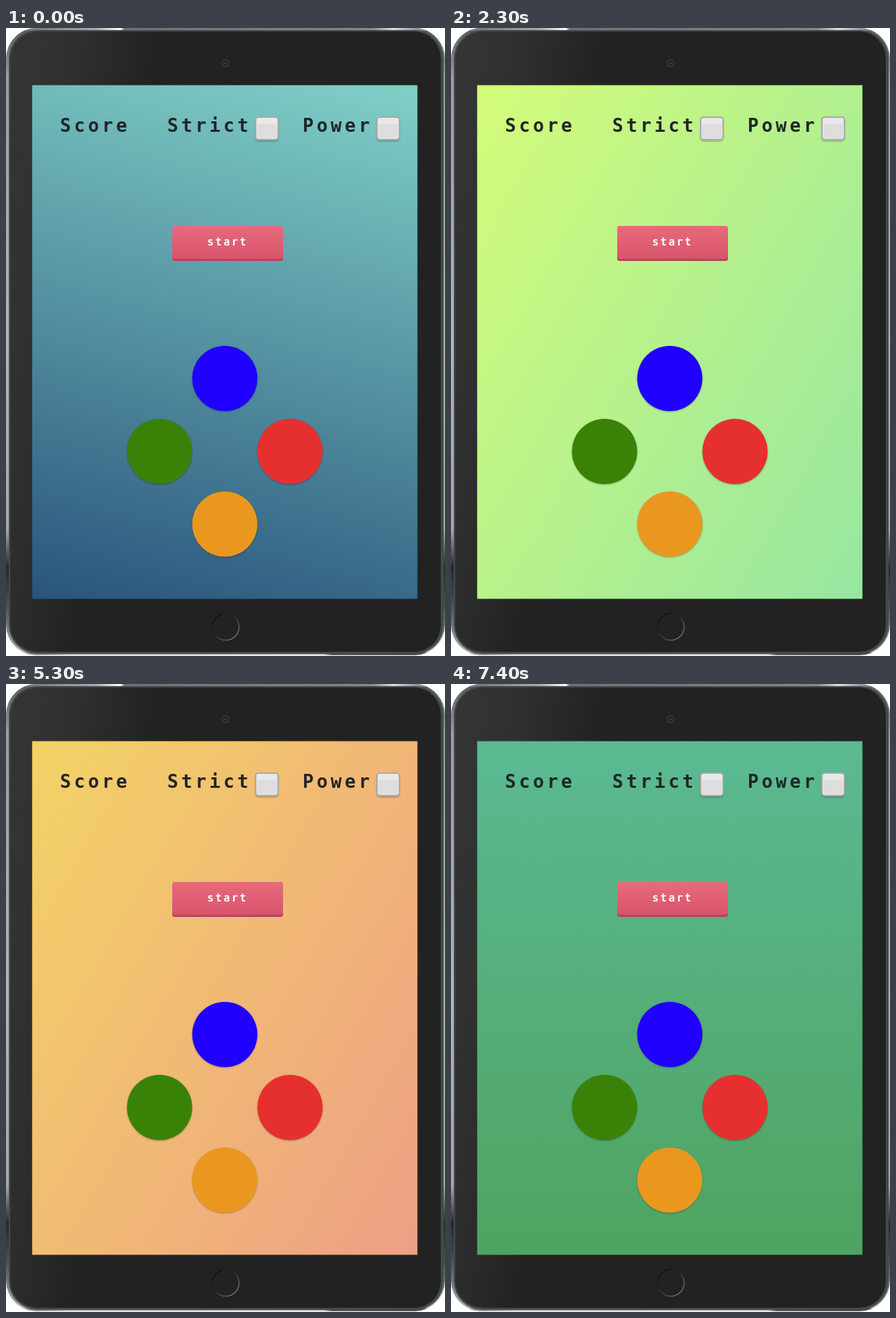
Write an HTML page that moves like this. It is 626 px wide and 895 px high and loops after 8000 ms.

```html
<!DOCTYPE html>
<html lang="en">
<head>
<meta charset="utf-8">
<title>Memory game on a tablet</title>
<style>
  html, body { margin: 0; width: 100%; height: 100%; overflow: hidden; background: #fff; }
  div, svg { position: absolute; box-sizing: border-box; }
  #tablet {
    left: 0; top: 0; width: 626px; height: 894px; border-radius: 44px; overflow: hidden;
    background: linear-gradient(#555b5b, #9b9e9d 8%, #b4b6b5 50%, #a5a8a7 80%, #252a29 86%, #4a5050 92%, #b0b2b1);
  }
  .edge { left: 24px; width: 580px; height: 4px; }
  #top { top: 0; background: linear-gradient(90deg, #6d7372, #a9acab 18%, #fff 24%, #6d7372 25%, #858a89 86%, #ddd 91%, #6d7372); }
  #bottom { bottom: 0; background: linear-gradient(90deg, #858a89, #b9bbba 12%, #c4c6c5 74%, #565d5c 76%, #4a5150); }
  #body {
    left: 4px; top: 3px; width: 620px; height: 889px; border-radius: 41px;
    border: solid #434a4a; border-width: 2px 4px 3px 2px;
    background: linear-gradient(98deg, #353535, #303030 12%, #222 29%);
  }
  #screen { left: 37px; top: 81px; width: 550px; height: 733px; clip-path: inset(.5px .3px .6px .3px); }
  svg { left: 0; top: 0; }
  text { font-family: "DejaVu Sans Mono", monospace; font-weight: bold; }
  .label { font-size: 26px; letter-spacing: 4.35px; fill: #212529; }
  .start { font-size: 15px; letter-spacing: 2.55px; fill: #fff; }
  .box {
    top: 126px; width: 34px; height: 34px; border: 2px solid #aaa; border-radius: 5px;
    background: linear-gradient(#e9e9e9 25%, #dcdcdc 35%, #dedede);
    box-shadow: inset 0 0 0 1px #e8e8e8, 0 2px 2px #0003;
  }
  #button {
    left: 237px; top: 282px; width: 158px; height: 50px; border-radius: 4px;
    background: linear-gradient(#e96a7c, #d6536a);
    box-shadow: inset 0 -3px #b5455b, inset 0 1px #e4707f;
  }
  .disc { filter: drop-shadow(0 1px 1px #0004); }
</style>
</head>
<body>
<div id="tablet">
  <div id="top" class="edge"></div>
  <div id="bottom" class="edge"></div>
  <div id="body"></div>
</div>
<div id="screen"></div>
<div class="box" style="left:355px"></div>
<div class="box" style="left:528px"></div>
<div id="button"></div>
<svg width="626" height="895">
  <defs>
    <linearGradient id="rim" x1="0" y1="0" x2="1" y2="1">
      <stop offset=".1" stop-color="#0c0c0c"/>
      <stop offset=".5" stop-color="#303030"/>
      <stop offset=".9" stop-color="#707070"/>
    </linearGradient>
  </defs>
  <circle cx="313" cy="50" r="5" fill="#20202a" stroke="#3b3b44" stroke-width="1.5"/>
  <circle cx="313" cy="50" r="2" fill="#353550"/>
  <circle cx="313.5" cy="853.5" r="19" fill="none" stroke="url(#rim)" stroke-width="1.6"/>
  <g class="label">
    <text x="77" y="147.5">Score</text>
    <text x="230" y="147.5">Strict</text>
    <text x="423" y="147.5">Power</text>
  </g>
  <text class="start" x="287" y="310">start</text>
  <g class="disc">
    <circle cx="312" cy="499.5" r="46.5" fill="#2000ff"/>
    <circle cx="219" cy="603.5" r="46.5" fill="#3a8207"/>
    <circle cx="405" cy="603.5" r="46.5" fill="#e6302f"/>
    <circle cx="312" cy="707" r="46.5" fill="#ea9720"/>
  </g>
</svg>
<script>
  const LOOP = 8000;
  const scenes = [
    { until: 500, fill: "15deg, #29547c, #80d0c7" },
    { until: 3500, fill: "120deg, #d4fc79, #96e6a1" },
    { until: 6500, fill: "120deg, #f3d365, #ee9f85" },
    { until: LOOP, fill: "0deg, #4fa361, #5bba93" }
  ];
  const screenStyle = document.getElementById("screen").style;
  let shown;

  function draw() {
    const time = performance.now() % LOOP;
    const scene = scenes.find(s => time < s.until);
    if (scene !== shown) {
      screenStyle.background = `linear-gradient(${scene.fill})`;
      shown = scene;
    }
    requestAnimationFrame(draw);
  }
  draw();
</script>
</body>
</html>
```
